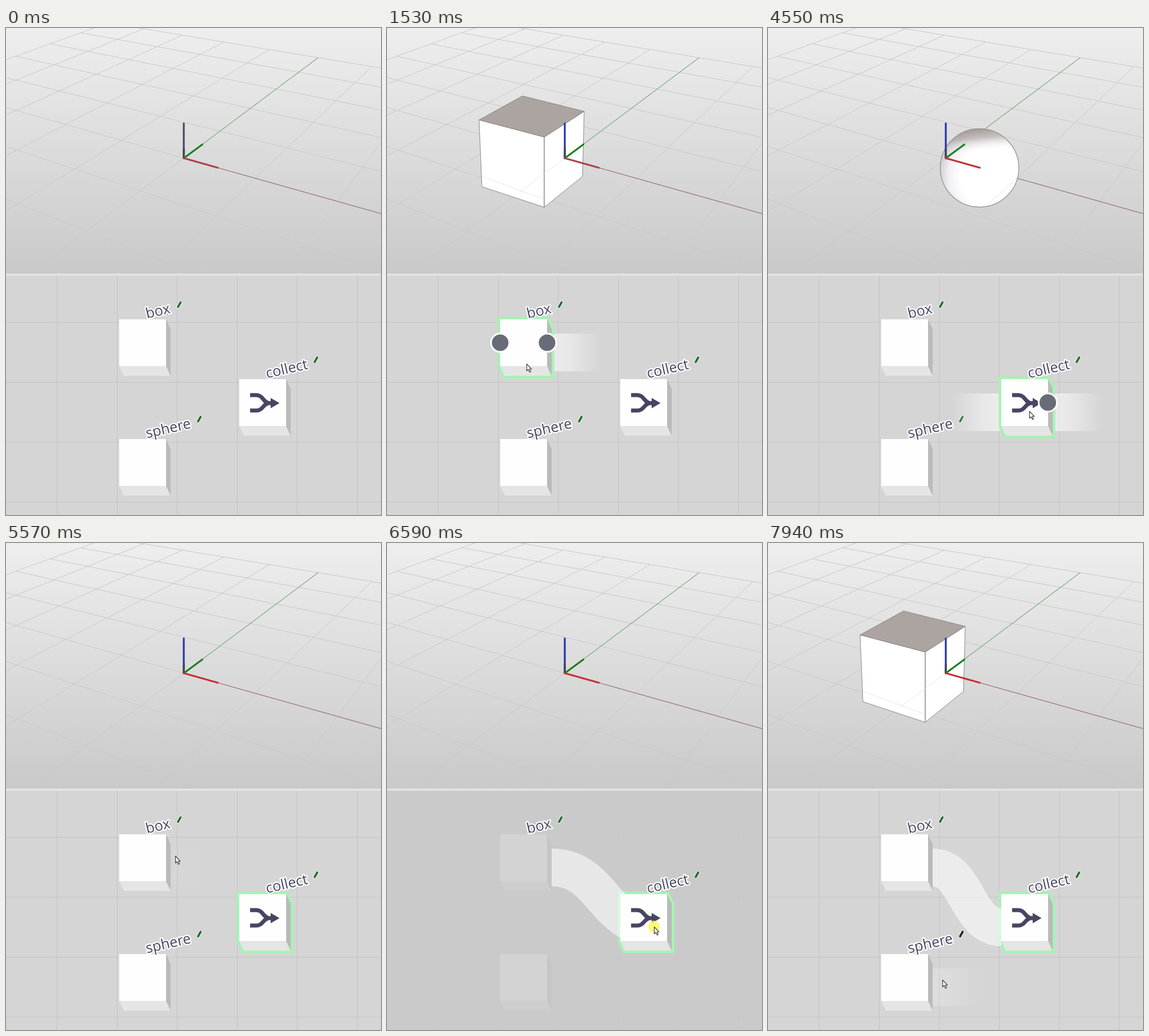
Write an HTML page that moves like this. It is 656 px wide and 853 px high and loops after 8000 ms.

```html
<!DOCTYPE html>
<html lang="en">
<head>
<meta charset="utf-8">
<title>Node editor</title>
<style>
  html, body { margin: 0; width: 100%; height: 100%; overflow: hidden; background: #d5d5d5; }
  svg { display: block; width: 100vw; height: 100vh; }
  text { font: 25px "Open Sans", "Noto Sans", sans-serif; fill: #464460; stroke: #fff; stroke-width: 4.5; stroke-linejoin: round; paint-order: stroke; }
  .thin { fill: none; stroke-width: 1; }
  .axis { stroke-width: 3.2; stroke-linecap: round; }
  .port { fill: #686c77; stroke: #fff; stroke-width: 3; }
  .outline { fill: none; stroke: #a6f2b4; stroke-width: 9; }
</style>
</head>
<body>
<svg viewBox="0 0 656 853" preserveAspectRatio="none">
  <defs>
    <linearGradient id="sky" x1="0" y1="0" x2="0" y2="1">
      <stop stop-color="#eee"/><stop offset="1" stop-color="#c9c9c9"/>
    </linearGradient>
    <linearGradient id="fadeRight">
      <stop stop-color="#fff" stop-opacity=".55"/><stop offset=".35" stop-color="#fff" stop-opacity=".45"/>
      <stop offset="1" stop-color="#fff" stop-opacity="0"/>
    </linearGradient>
    <radialGradient id="ball" gradientUnits="userSpaceOnUse" cx="394" cy="260" r="96">
      <stop offset=".6" stop-color="#fff"/><stop offset=".82" stop-color="#f1eff3"/><stop offset="1" stop-color="#cfcbd0"/>
    </radialGradient>
    <linearGradient id="shade" x1=".45" y1="0" x2=".55" y2="1">
      <stop stop-color="#978e8b" stop-opacity=".85"/><stop offset=".12" stop-color="#a49c9a" stop-opacity=".6"/>
      <stop offset=".3" stop-color="#fff" stop-opacity="0"/>
    </linearGradient>
  </defs>

  <rect width="656" height="431" fill="url(#sky)"/>
  <path id="floor" class="thin" stroke="#c8c8c8"/>
  <path class="thin" stroke="#4f9d55" d="M311 228L546 52"/>
  <path class="thin" stroke="#935f66" d="M311 228L656 325"/>
  <g id="cube" stroke="#8b8785" stroke-linejoin="round">
    <path fill="#fff" d="M161 161L275 191V314L166 278ZM275 191L345 146L342 260L275 314Z"/>
    <path fill="#aba4a1" d="M161 161L237 119L345 146L275 191Z"/>
    <path class="thin" stroke="#e6e6e6" d="M166 260L275 300M311 228L232 287"/>
  </g>
  <g id="ballShape">
    <circle cx="370" cy="245" r="68.7" fill="url(#ball)"/>
    <circle cx="370" cy="245" r="68.7" fill="url(#shade)" stroke="#98918f" stroke-width="1.3"/>
    <path class="thin" stroke="#e2e2e2" d="M380 313L435 264"/>
  </g>
  <path id="zAxis" class="axis" d="M311 228V167"/>
  <path class="axis" stroke="#3f4658" d="M310.8 227L311.2 212"/>
  <path class="axis" stroke="#188020" d="M311 228L343.5 204"/>
  <path id="xAxis" class="axis" d="M311 228L370.5 244.7"/>

  <rect y="434" width="656" height="419" fill="#d5d5d5"/>
  <path id="tiles" class="thin" stroke="#c3c3c3"/>
  <rect y="430" width="656" height="4" fill="#e2e2e2"/>
  <g id="back"></g>
  <rect id="dim" y="434" width="656" height="419" fill="#c9c9c9"/>
  <g id="front"></g>
  <circle id="press" r="10.5" fill="#fdf766" fill-opacity=".85"/>
  <path id="pointer" fill="#fff" stroke="#333" stroke-width="1.1" stroke-linejoin="round" d="M.5 .5V12.5L3.3 10L5.4 14.8L7.4 13.9L5.3 9.3H9Z"/>
</svg>
<script>
const LOOP = 8000;
const $ = id => document.getElementById(id);
const clamp = v => Math.max(0, Math.min(1, v));
const ease = v => v < .5 ? 2 * v * v : 1 - 2 * (1 - v) * (1 - v);
const within = (t, spans) => spans.some(([a, b]) => t >= a && t < b);
const show = (el, on) => el.setAttribute('opacity', +on);

// Fades in after each span starts and out after it ends.
const fade = (t, spans, ms = 110) =>
  Math.max(0, ...spans.map(([a, b]) => Math.min(clamp((t - a) / ms), 1 - clamp((t - b) / ms))));

// Perspective projection of the ground plane.
function project(x, y) {
  const w = 1 - .0325 * x + .047 * y;
  return [(311 + 48.2 * x + 49.16 * y) / w, (228 + 9.25 * x - 15.16 * y) / w].map(v => v.toFixed(1));
}

let floor = '', tiles = '';
for (let i = -10; i <= 10; i += 2) {
  floor += `M${project(i, -10)}L${project(i, 10)}M${project(-10, i)}L${project(10, i)}`;
}
for (let i = 0; i < 6; i++) tiles += `M${89.5 + 105 * i} 434V853`;
for (let i = 0; i < 4; i++) tiles += `M0 ${515.5 + 105 * i}H656`;
$('floor').setAttribute('d', floor);
$('tiles').setAttribute('d', tiles);

const at = (x, y, body, id = '') => `<g ${id && `id="${id}"`} transform="translate(${x} ${y})">${body}</g>`;
const tail = (id, flip) =>
  `<rect id="${id}" y="25" width="87" height="66" fill="url(#fadeRight)" transform="translate(${flip ? 0 : 90})${flip ? 'scale(-1 1)' : ''}"/>`;
const outline = name => `<path id="${name}Outline" class="outline" d="M0 0H82L90 17V99H8L0 82Z"/>`;
const block = `<path fill="#e5e5e5" d="M0 82H82L90 99H8Z"/><path fill="#bababa" d="M82 0L90 17V99L82 82Z"/><path fill="#fefefe" d="M0 0H82V82H0Z"/>`;
const port = x => `<circle class="port" cx="${x}" cy="41" r="16"/>`;
const label = (name, px, py) => `<text transform="translate(48.5 -1.5) rotate(-13)">${name}</text>
  <g stroke-linecap="round"><path stroke="#fff" stroke-width="6" opacity=".5" d="M${px - 2} ${py + 4}l4.5 -8"/>
  <path id="${name}Pencil" stroke-width="3.6" d="M${px - 2} ${py + 4}l4.5 -8"/>
  <path stroke="#173d20" stroke-width="1" d="M${px - 2.8} ${py + 5}l5 -9"/></g>`;
const icon = `<g fill="none" stroke="#474563" stroke-width="7"><path d="M19 28H30C42 28 42 42 53 42H60M19 55H30C42 55 42 42 53 42"/></g>
  <path fill="#474563" d="M55 33L70.5 42L55 51Z"/>`;

const BOX = [198, 510.3], SPHERE = [198, 720], COLLECT = [408, 615];
$('back').innerHTML =
  at(...BOX, tail('boxTail') + outline('box') + block) +
  at(...SPHERE, tail('sphereTail') + outline('sphere') + block) +
  at(...SPHERE, port(0) + port(82), 'spherePorts') +
  at(...SPHERE, label('sphere', 140, -35), 'sphereLabel');
$('front').innerHTML =
  at(...COLLECT, tail('collectOut') + tail('collectIn', true) + outline('collect')) +
  '<path id="link" fill="none" stroke="#fff" stroke-opacity=".55" stroke-width="66"/>' +
  at(...BOX, port(0) + port(82), 'boxPorts') +
  at(...BOX, label('box', 105, -26)) +
  at(...COLLECT, block + icon) +
  at(...COLLECT, port(81.5), 'collectPorts') +
  at(...COLLECT, label('collect', 134, -34));
for (const name of ['box', 'collect', 'sphere']) $(name + 'Pencil').setAttribute('stroke', '#26823a');

// Pointer moves: start, end, from, to.
const MOVES = [
  [520, 1270, 537, 818, 244, 588],
  [2070, 2350, 244, 588, 248, 793],
  [3470, 4170, 248, 793, 457, 671],
  [4690, 5030, 457, 671, 467, 676],
  [5310, 5570, 467, 676, 296, 548],
  [5910, 6590, 296, 548, 467, 672],
  [7400, 7940, 467, 672, 305, 765]
];
function pointerAt(t) {
  const [a, b, x0, y0, x1, y1] = MOVES.findLast(m => t >= m[0]) || MOVES[0];
  const k = ease(clamp((t - a) / (b - a)));
  return [x0 + (x1 - x0) * k, y0 + (y1 - y0) * k];
}

const DRAG = 5910, DROP = 6780;
const PRESSES = [[1330, 1450], [2490, 2610], [4420, 4530], [DRAG, DROP]];

function draw(t) {
  const [x, y] = pointerAt(t);
  $('pointer').setAttribute('transform', `translate(${x} ${y})`);
  $('press').setAttribute('transform', `translate(${x} ${y})`);
  show($('pointer'), t >= 520);
  show($('press'), within(t, PRESSES));

  show($('cube'), within(t, [[1500, 2890], [6950, LOOP]]));
  show($('ballShape'), within(t, [[2890, 4690]]));
  $('zAxis').setAttribute('stroke', t < 1500 ? '#46466a' : '#2336a8');
  $('xAxis').setAttribute('stroke', t < 2890 ? '#a9444a' : '#c63033');

  show($('boxOutline'), within(t, [[1390, 2550]]));
  show($('sphereOutline'), within(t, [[2550, 4420]]));
  show($('collectOutline'), t >= 4420);

  const boxHover = fade(t, [[1180, 2150]]);
  const sphereHover = fade(t, [[2230, 3620]]);
  const collectHover = fade(t, [[3960, 5340], [DROP, 7480]]);
  show($('boxPorts'), boxHover);
  show($('spherePorts'), sphereHover);
  show($('collectPorts'), collectHover);
  $('boxTail').setAttribute('opacity', t > 5500 ? (t < DRAG ? .15 * clamp((t - 5500) / 200) : 0) : boxHover);
  $('sphereTail').setAttribute('opacity', t > 7700 ? .35 * clamp((t - 7780) / 160) : sphereHover);
  $('collectOut').setAttribute('opacity', collectHover);
  $('collectIn').setAttribute('opacity', t < 7200 ? collectHover : 0);

  const dimmed = fade(t, [[DRAG, DROP]], 90);
  $('dim').setAttribute('opacity', .8 * dimmed);
  show($('sphereLabel'), 1 - dimmed);
  $('spherePencil').setAttribute('stroke', t < DROP ? '#26823a' : '#20262a');

  const [ex, ey] = t < DROP ? [x, y] : [408, 673];
  const mid = (288 + ex) / 2;
  show($('link'), t >= DRAG);
  $('link').setAttribute('d', `M288 568.3C${mid} 568.3 ${mid} ${ey} ${ex} ${ey}`);
}

const start = performance.now();
function tick() {
  draw((performance.now() - start) % LOOP);
  requestAnimationFrame(tick);
}
tick();
</script>
</body>
</html>
```
